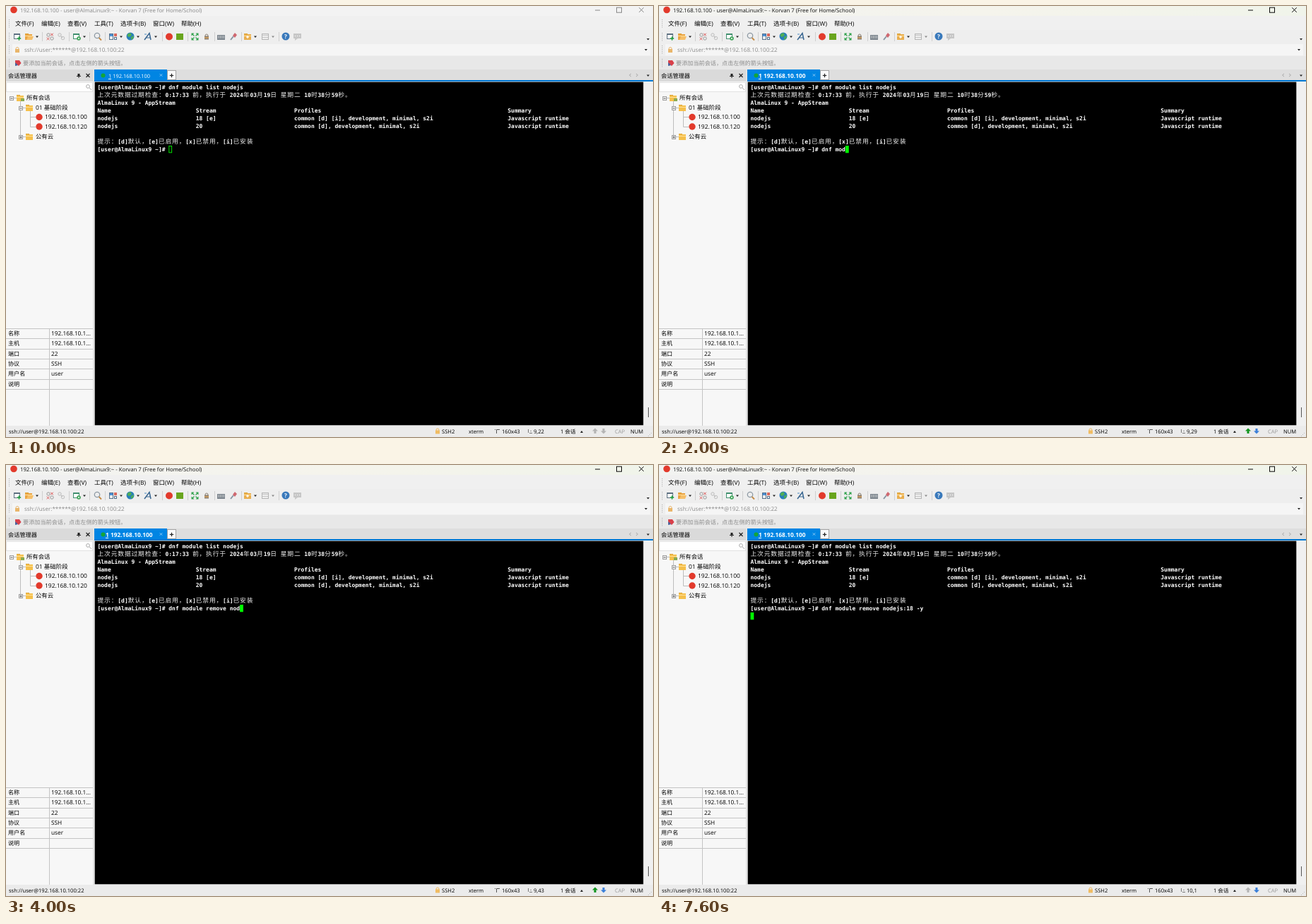
Animation of 916x611 px, one loop 8 s. Source, as an HTML page with a canvas:

```html
<!DOCTYPE html>
<html lang="zh-CN">
<head>
<meta charset="utf-8">
<title>Terminal session</title>
<style>
html, body { margin: 0; width: 100%; height: 100%; overflow: hidden; background: #f0f0f0; }
canvas { display: block; width: 916px; height: 611px; }
</style>
</head>
<body>
<canvas id="stage" width="916" height="611"></canvas>
<script>
const ctx = document.getElementById('stage').getContext('2d');
ctx.textRendering = 'geometricPrecision';

const LOOP = 8000;
const UI = '"Open Sans", "Noto Sans CJK SC", "Noto Sans CJK", sans-serif';
const MONO = '"DejaVu Sans Mono", monospace';
const HAN = '"Noto Sans CJK SC", "Noto Sans CJK", sans-serif';

// Terminal grid
const CELL = 4.8, ROW = 11, LEFT = 129.5, TOP = 110;
const PROMPT = '[user@AlmaLinux9 ~]# ';
const COMMAND = 'dnf module remove nodejs:18 -y';
const ENTER = 7400;
const KEYS = [
  800, 1000, 1100, 1200, 1300, 1400, 2000, 2100, 2300, 2400, 2500,
  2900, 3000, 3100, 3200, 3300, 3500, 3600, 3800, 3900, 4000,
  4300, 4400, 4500, 4900, 5700, 5800, 6000, 6300, 6700
];
const columns = (a, b, c, d) => a.padEnd(29) + b.padEnd(29) + c.padEnd(63) + d;
const LINES = [
  PROMPT + 'dnf module list nodejs',
  '上次元数据过期检查：0:17:33 前，执行于 2024年03月19日 星期二 10时38分59秒。',
  'AlmaLinux 9 - AppStream',
  columns('Name', 'Stream', 'Profiles', 'Summary'),
  columns('nodejs', '18 [e]', 'common [d] [i], development, minimal, s2i', 'Javascript runtime'),
  columns('nodejs', '20', 'common [d], development, minimal, s2i', 'Javascript runtime'),
  '',
  '提示：[d]默认，[e]已启用，[x]已禁用，[i]已安装'
];

function rect(x, y, w, h, color) {
  ctx.fillStyle = color;
  ctx.fillRect(x, y, w, h);
}

function box(x, y, w, h, color) {
  ctx.strokeStyle = color;
  ctx.lineWidth = 1;
  ctx.strokeRect(x + .5, y + .5, w - 1, h - 1);
}

function disc(x, y, r, color) {
  ctx.fillStyle = color;
  ctx.beginPath();
  ctx.arc(x, y, r, 0, Math.PI * 2);
  ctx.fill();
}

function ring(x, y, r, color, width = 1) {
  ctx.strokeStyle = color;
  ctx.lineWidth = width;
  ctx.beginPath();
  ctx.arc(x, y, r, 0, Math.PI * 2);
  ctx.stroke();
}

function path(points, color, width = 1) {
  ctx.strokeStyle = color;
  ctx.lineWidth = width;
  ctx.beginPath();
  for (let i = 0; i < points.length; i += 2) ctx.lineTo(points[i], points[i + 1]);
  ctx.stroke();
}

function shape(points, color) {
  ctx.fillStyle = color;
  ctx.beginPath();
  for (let i = 0; i < points.length; i += 2) ctx.lineTo(points[i], points[i + 1]);
  ctx.fill();
}

function label(text, x, y, size = 8.4, color = '#000', weight = '') {
  ctx.font = `${weight} ${size}px ${UI}`;
  ctx.fillStyle = color;
  ctx.fillText(text, x, y);
}

const drop = (x, y, color = '#222') => shape([x - 2, y - 1, x + 2, y - 1, x, y + 1.5], color);
const divider = x => rect(x, 37, 1, 13, '#cfcfcf');

function plus(x, y, r, color, width = 1) {
  path([x - r, y, x + r, y], color, width);
  path([x, y - r, x, y + r], color, width);
}

function cross(x, y, r, color, width = 1) {
  path([x - r, y - r, x + r, y + r], color, width);
  path([x + r, y - r, x - r, y + r], color, width);
}

function folder(x, y, color = '#f5c04c') {
  rect(x, y - 4, 5, 3, '#dca234');
  rect(x, y - 3, 10, 8, color);
  rect(x, y - 1, 10, 1, '#ffe09a');
}

function lock(x, y, color) {
  ring(x, y - 1.5, 2, color);
  rect(x - 3, y - 1, 6, 5, color);
}

function windowIcon(x, y, color) {
  rect(x - 5, y - 4, 9, 8, '#fff');
  box(x - 5, y - 4, 9, 8, color);
  rect(x - 5, y - 4, 9, 2, color);
}

function arrow(x, y, dir, color) {
  shape([x, y - 4 * dir, x + 4, y, x + 1.5, y, x + 1.5, y + 3.5 * dir,
    x - 1.5, y + 3.5 * dir, x - 1.5, y, x - 4, y], color);
}

function titleBar(focus) {
  rect(0, 0, 916, 14, '#f3f3f3');
  const tint = ctx.createLinearGradient(0, 0, 916, 0);
  tint.addColorStop(0, '#f2f3f1');
  tint.addColorStop(.5, '#f5f4ec');
  tint.addColorStop(1, '#f0f4ea');
  ctx.globalAlpha = focus;
  rect(0, 0, 916, 14, tint);
  ctx.globalAlpha = 1;
  const v = Math.round(135 - 125 * focus);
  const ink = `rgb(${v},${v},${v})`;
  disc(11, 5.5, 4.8, '#e23a2c');
  label('192.168.10.100 - user@AlmaLinux9:~ - Korvan 7 (Free for Home/School)', 20, 8.5, 7.75, ink);
  path([834, 6, 841, 6], ink);
  box(864, 1.7, 8, 8, ink);
  cross(899.5, 5.6, 3.3, ink);
}

function menuBar() {
  rect(0, 14, 916, 20, '#f0f0f0');
  const items = { '文件(F)': 13, '编辑(E)': 50, '查看(V)': 87, '工具(T)': 125, '选项卡(B)': 162, '窗口(W)': 208, '帮助(H)': 248 };
  for (const name in items) label(name, items[name], 28, 8.5);
}

function toolBar() {
  rect(0, 34, 916, 18, '#eeeeee');
  [51, 89, 118, 140, 221, 257, 295, 333, 386].forEach(divider);
  [44, 111, 163, 187, 212, 353].forEach(x => drop(x, 43.5));
  drop(378, 43.5, '#888');
  drop(909, 47);

  windowIcon(16, 43, '#5c6f80');
  plus(18.5, 46, 2.7, '#25a244', 1.6);
  folder(27, 43, '#eaa443');
  shape([29, 48, 31, 43, 39, 43, 37, 48], '#f6bf69');

  ring(60, 41, 2.2, '#999');
  ring(65, 46, 2.2, '#999');
  cross(65, 40.5, 1.8, '#d95050');
  cross(59.5, 46.5, 1.8, '#d95050');
  ring(76, 41, 2.2, '#bbb');
  ring(80.5, 45.5, 2.2, '#bbb');
  path([77, 42, 80, 45], '#bbb');

  windowIcon(100, 43, '#3f8f6d');
  disc(103, 46, 2.8, '#42a65b');
  disc(103, 46, 1, '#fff');
  ring(129, 42, 3.7, '#8d99a3', 1.3);
  path([131.6, 45, 135, 48.5], '#c58b45', 1.8);

  box(146, 39, 6, 9, '#53708c');
  rect(147, 40, 4, 3, '#4c91d5');
  rect(153, 39, 4, 4, '#d9685c');
  box(153, 44, 4, 4, '#53708c');
  disc(176, 43, 5.5, '#287fba');
  shape([172, 40, 176, 38, 178, 41, 175, 44, 172, 43], '#4fae55');
  shape([177, 44, 181, 42, 180, 46, 177, 48], '#4fae55');
  path([196, 48, 203, 38.5, 205, 48], '#36648f', 1.5);
  path([199, 45, 205, 45], '#36648f');
  path([196, 40, 199, 40], '#4b8ac1');

  disc(231, 43.5, 5, '#e23a2c');
  rect(241, 39, 10, 9, '#69a51d');

  for (const sx of [-1, 1]) for (const sy of [-1, 1]) {
    const x = 267.5 + sx * 5, y = 43.5 + sy * 5;
    shape([x, y, x - sx * 4, y, x, y - sy * 4], '#31a24c');
    path([x - sx, y - sy, 267.5 + sx, 43.5 + sy], '#31a24c', 1.3);
  }
  lock(284, 43.5, '#8b8073');
  rect(281, 44, 6, 2, '#c59961');

  rect(299, 41, 11, 7, '#7c858d');
  for (let i = 0; i < 4; i++) {
    rect(300.5 + i * 2.4, 42.5, 1.2, 1, '#fff');
    rect(300.5 + i * 2.4, 44.5, 1.2, 1, '#fff');
  }
  path([318, 48, 322, 43], '#8795a3', 2);
  shape([321, 42, 324, 38, 327, 41, 324, 45], '#cf6870');

  folder(337, 43, '#e9ae4e');
  plus(342, 44, 2, '#fff', 1.2);
  box(362, 39, 10, 9, '#b5b5b5');
  rect(363, 41, 8, 1, '#c5c5c5');
  rect(363, 44, 8, 1, '#c5c5c5');

  disc(396, 43, 5.5, '#3979bb');
  label('?', 394, 46, 8, '#fff', 'bold');
  rect(407, 39, 11, 7, '#c7c7c7');
  shape([409, 46, 413, 46, 409, 49], '#c7c7c7');
  for (let i = 0; i < 3; i++) rect(409 + i * 3, 42, 1, 1, '#fff');
}

function addressBar() {
  rect(0, 52, 916, 19, '#eeeeee');
  rect(9, 54, 903, 16, '#f5f5f5');
  lock(16, 62, '#e9b66b');
  label('ssh://user:******@192.168.10.100:22', 26, 65, 8.05, '#8a8a8a');
  drop(906, 62);

  rect(0, 71, 916, 19, '#e8e8e8');
  shape([13, 77, 19, 77, 21.5, 81, 18, 85, 13, 81], '#d8404a');
  shape([13, 80, 17, 84, 13, 85], '#44609c');
  label('要添加当前会话，点击左侧的箭头按钮。', 24, 84, 8.15, '#8a8a8a');
  for (const y of [19, 38, 56, 75]) {
    for (let i = 0; i < 5; i++) rect(4, y + i * 2.6, 1, 1, '#aaa');
  }
}

function sidebar() {
  rect(0, 90, 125, 505, '#f7f7f7');
  rect(0, 90, 125, 17, '#dadada');
  label('会话管理器', 3, 102, 8.2);
  rect(101.5, 96, 3, 3, '#222');
  path([100, 99.5, 106, 99.5], '#222');
  path([103, 99, 103, 102], '#222');
  cross(116, 98.5, 2.5, '#222', 1.2);
  rect(0, 108, 123, 14, '#fff');
  box(0, 108, 123, 14, '#e2e2e2');
  ring(116, 114, 2.4, '#aaa');
  path([118, 116, 121, 119], '#aaa');

  path([7.5, 134, 7.5, 130.5, 15, 130.5], '#bdbdbd');
  path([20.5, 135, 20.5, 185.5, 28, 185.5], '#bdbdbd');
  path([20.5, 144.5, 28, 144.5], '#bdbdbd');
  path([34.5, 149, 34.5, 171.5, 42, 171.5], '#bdbdbd');
  path([34.5, 157.5, 42, 157.5], '#bdbdbd');
  [[5, 128, 0], [18, 142, 0], [18, 183, 1]].forEach(([x, y, closed]) => {
    rect(x, y, 6, 6, '#fff');
    box(x, y, 6, 6, '#9b9b9b');
    rect(x + 1.5, y + 2.5, 3, 1, '#444');
    if (closed) rect(x + 2.5, y + 1.5, 1, 3, '#444');
  });
  folder(15, 130);
  rect(21, 131, 5, 4, '#8aab51');
  folder(28, 144);
  folder(28, 185);
  label('所有会话', 29, 133, 8.4);
  label('01 基础阶段', 42, 146.7, 8.45);
  disc(47, 157.5, 4.7, '#e23a2c');
  disc(47, 171, 4.7, '#e23a2c');
  label('192.168.10.100', 55, 160.2, 8.45);
  label('192.168.10.120', 55, 174, 8.45);
  label('公有云', 42, 187.7, 8.4);

  const rows = ['名称', '192.168.10.1...', '主机', '192.168.10.1...', '端口', '22', '协议', 'SSH', '用户名', 'user', '说明', ''];
  for (let i = 0; i < 6; i++) {
    const y = 457 + i * 14.35;
    rect(0, Math.round(y), 123, 1, '#c4c4c4');
    label(rows[i * 2], 3, y + 9.8, 8.1);
    label(rows[i * 2 + 1], 64, y + 9.8, 8.3);
  }
  rect(0, 543, 123, 1, '#c4c4c4');
  rect(61, 457, 1, 138, '#c4c4c4');
  rect(123, 90, 2, 505, '#e4e4e4');
}

function tabs(focused) {
  rect(125, 90, 791, 16, '#dedede');
  rect(125, 90, 103, 16, '#0085e3');
  rect(125, 105, 791, 2, '#0078d4');
  disc(137.5, 98.5, 3, '#13a538');
  const x = focused ? 141 : 145;
  label('1 192.168.10.100', x, 101.5, focused ? 8.35 : 7.45, '#fff', focused ? 'bold' : '');
  rect(x, 103, 4, 1, '#fff');
  cross(219.5, 98, 1.7, '#8ec9f3');
  rect(228, 91, 13, 14, '#fafafa');
  box(228, 91, 13, 14, '#a2a2a2');
  plus(234.5, 98.5, 2.7, '#222', 1.2);
  path([885, 96, 882.5, 98, 885, 100], '#aaa');
  path([892, 96, 894.5, 98, 892, 100], '#aaa');
  drop(909, 98.5);
}

// Draws one line of text cell by cell; wide characters take two cells.
function termLine(text, row) {
  let col = 0;
  for (const ch of text) {
    const wide = ch > '\u2fff';
    if (ch !== ' ') {
      ctx.font = wide ? `8.8px ${HAN}` : `bold 7.97px ${MONO}`;
      ctx.fillStyle = wide ? '#eee' : '#fff';
      ctx.fillText(ch, LEFT + col * CELL, TOP + row * ROW + 8);
    }
    col += wide ? 2 : 1;
  }
}

function terminal(s) {
  rect(125, 107, 791, 488, '#f0f0f0');
  rect(125.7, 107.7, 776.6, 486.6, '#000');
  rect(909, 569, 1, 14, '#555');
  LINES.forEach(termLine);
  termLine(PROMPT + COMMAND.slice(0, s.typed), 8);
  const x = LEFT + (s.col - 1) * CELL;
  const y = TOP + (s.row - 1) * ROW;
  if (s.focus) rect(x, y, CELL, 10.3, '#00ff00');
  else box(x, y, CELL, 10.3, '#00e000');
}

function statusBar(s) {
  rect(0, 595, 916, 16, '#ebebeb');
  const text = (str, x, color) => label(str, x, 606, 7.6, color);
  text('ssh://user@192.168.10.100:22', 4);
  lock(611, 602.5, '#f0bc63');
  text('SSH2', 617);
  text('xterm', 655);
  path([694.5, 606, 694.5, 600.5, 699, 600.5], '#555');
  rect(692, 600, 1, 1, '#555');
  text('160x43', 702);
  rect(739, 600, 1, 5, '#777');
  path([741, 605.5, 745, 605.5], '#777');
  rect(742, 602, 2, 1, '#999');
  text(`${s.row},${s.col}`, 747);
  text('1 会话', 785);
  shape([813, 605, 817, 605, 815, 602], '#222');
  arrow(834, 602.5, 1, s.sending ? '#12951f' : '#b4b4b4');
  arrow(846, 602.5, -1, s.focus ? '#3a7fd9' : '#b4b4b4');
  text('CAP', 862, '#999');
  text('NUM', 884);
  for (let i = 0; i < 3; i++) rect(913 - i * 2, 605 + i * 2, 1, 1, '#bbb');
}

function stateAt(t) {
  const typed = KEYS.filter(k => k <= t).length;
  const entered = t >= ENTER;
  const last = entered ? ENTER : typed ? KEYS[typed - 1] : -LOOP;
  return {
    focus: Math.min(3, Math.floor(t / 100)) / 3,
    typed,
    row: entered ? 10 : 9,
    col: entered ? 1 : PROMPT.length + typed + 1,
    sending: t - last < 200
  };
}

let shown = '';
function draw() {
  const s = stateAt(performance.now() % LOOP);
  const key = JSON.stringify(s);
  if (key !== shown) {
    shown = key;
    titleBar(s.focus);
    menuBar();
    toolBar();
    addressBar();
    sidebar();
    tabs(s.focus > 0);
    terminal(s);
    statusBar(s);
  }
  requestAnimationFrame(draw);
}
draw();
</script>
</body>
</html>
```
